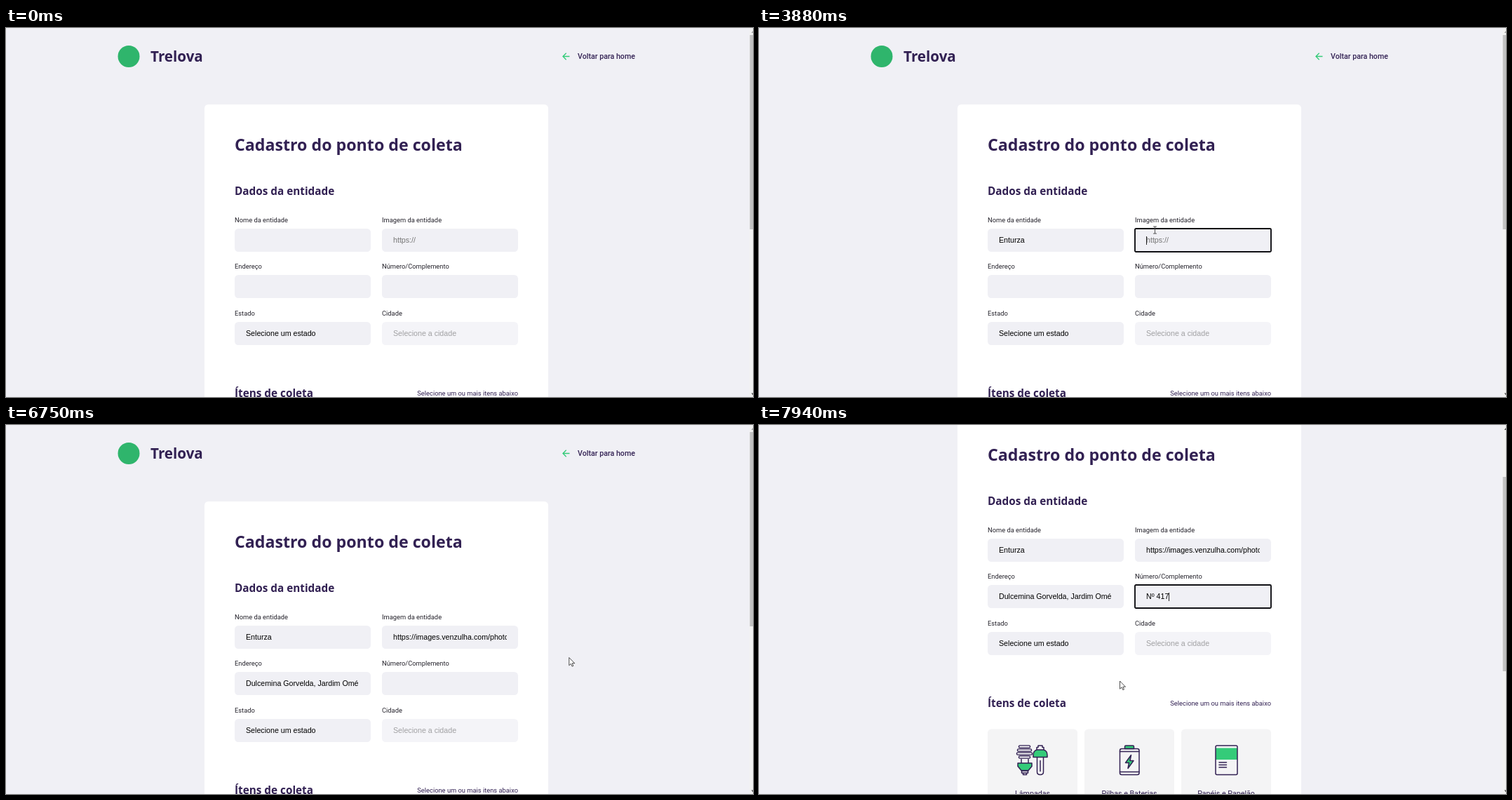
These frames come from a looping animation (1065 px wide and 526 px high, 8000 ms). An HTML page:

```html
<!DOCTYPE html>
<html lang="pt-BR">
<head>
<meta charset="utf-8">
<title>Cadastro</title>
<style>
  html, body { margin: 0; width: 100%; height: 100%; overflow: hidden; background: #f0f0f5; }
  svg { display: block; }
  text { fill: #322153; font-family: Roboto, sans-serif; }
  .head { font-family: "Open Sans", "Noto Sans", sans-serif; font-weight: 700; }
  .small { font-size: 9.33px; }
  .label { fill: #24222b; }
  .item { font-size: 10.67px; text-anchor: middle; }
  .value { font: 10.67px "Liberation Sans", Arial, sans-serif; fill: #000; }
  .card { fill: #f4f4f5; }
  .icon { fill: none; stroke: #322153; stroke-width: 1.5; stroke-linejoin: round; stroke-linecap: round; }
  .green { fill: #34cb79; }
</style>
</head>
<body>
<svg width="1065" height="526" viewBox="0 0 1065 526">
  <rect width="1065" height="526" fill="#f0f0f5"/>
  <g id="page">
    <circle cx="175" cy="40.5" r="15.5" fill="#2fb56c"/>
    <text class="head" x="206" y="48" font-size="20.6">Trelova</text>
    <path d="M803.5 40.5H794M798.7 35.8L794 40.5L798.7 45.2" fill="none" stroke="#34cb79" stroke-width="1.3"/>
    <text x="815" y="44.4" font-size="10.67" font-weight="500">Voltar para home</text>

    <rect x="283" y="109" width="490" height="900" rx="5.3" fill="#fff"/>
    <text class="head" x="326" y="174.5" font-size="23.2">Cadastro do ponto de coleta</text>
    <text class="head" x="326" y="238" font-size="15.3">Dados da entidade</text>
    <g id="form"></g>
    <text class="head" x="326" y="526.2" font-size="15.3">Ítens de coleta</text>
    <text class="small" x="730" y="524" text-anchor="end">Selecione um ou mais itens abaixo</text>

    <g transform="translate(326 557.5)">
      <rect class="card" width="128" height="120" rx="5.3"/>
      <g class="icon">
        <path d="M46 25H59M44 30H61M43 35H62M46 40H59" stroke-width="4.6"/>
        <path d="M46 25H59M44 30H61M43 35H62M46 40H59" stroke="#f4f4f5" stroke-width="1.8"/>
        <path class="green" d="M43 48.5H63V53L58 59H48L43 53Z"/>
        <path d="M48 43V48M58 43V48M48.5 59.5H57.5V62.5H48.5ZM50.5 62.5V65H55.5V62.5"/>
        <path class="green" d="M65 40V37Q65 31 70 29.5H80Q85 31 85 37V40Z"/>
        <path d="M70 29V26H72V23.5H78V26H80V29M70.5 40V61Q70.5 65 75 65T79.5 61V40M75 45V60"/>
      </g>
      <text class="item" x="64" y="95">Lâmpadas</text>
    </g>
    <g transform="translate(464 557.5)">
      <rect class="card" width="128" height="120" rx="5.3"/>
      <g class="icon">
        <path class="green" d="M57.5 28V25Q57.5 23.5 59 23.5H69Q70.5 23.5 70.5 25V28Z"/>
        <rect x="50.5" y="28" width="27.5" height="37" rx="2.5"/>
        <path d="M50.5 32H78M50.5 61H78"/>
        <path class="green" d="M66.5 37L58.5 48H63.5L62 56L70 45H65Z"/>
      </g>
      <text class="item" x="64" y="95">Pilhas e Baterias</text>
    </g>
    <g transform="translate(602 557.5)">
      <rect class="card" width="128" height="120" rx="5.3"/>
      <g class="icon">
        <rect class="green" stroke="none" x="49" y="27" width="31" height="16.5"/>
        <rect x="49" y="23.5" width="31" height="41.5" rx="2"/>
        <path d="M54 47.5H64.5M54 51H64.5M54 54.5H64.5"/>
      </g>
      <text class="item" x="64" y="95">Papéis e Papelão</text>
    </g>

    <rect id="ring" width="194" height="33" rx="1.5" fill="none" stroke="#101014" stroke-width="1.9"/>
    <path id="caret" d="M0.5 0V12" stroke="#222"/>
  </g>

  <rect x="1060" width="5" height="526" fill="#f1f1f1"/>
  <rect id="thumb" x="1060.5" width="5" height="277" fill="#c1c1c1"/>
  <path id="up" d="M1062.5 7L1065.5 3.5L1068.5 7Z"/>
  <path d="M1062.5 520.5L1065.5 524L1068.5 520.5Z" fill="#505050"/>

  <g id="pointer">
    <circle id="click" cx="-1.3" cy="-0.8" r="8" fill="#fbf05f" opacity=".9"/>
    <path id="arrow" d="M0 0V11.2L2.6 8.8L4.3 12.6L6 11.9L4.4 8.2H8Z" fill="#fff" stroke="#222" stroke-width=".8"/>
    <path id="beam" d="M-2.5 -5H2.5M-2.5 5H2.5M0 -5V5" fill="none" stroke="#444" stroke-width=".9"/>
  </g>
</svg>
<script>
const LOOP = 8000;
const BLINK = 530;
const CLICK = 160;
const WIDTH = 194, HEIGHT = 33, PAD = 16;
const $ = id => document.getElementById(id);

// Where the pointer comes to rest; "focus" names the field clicked there, -1 leaves the form.
const stops = [
  { at: 150, x: 810, y: 474 },
  { at: 400, travel: 250, x: 416, y: 275 },
  { at: 940, travel: 390, x: 422, y: 296 },
  { at: 1240, travel: 140, x: 513, y: 317 },
  { at: 1420, travel: 140, x: 424, y: 299, focus: 0 },
  { at: 3600, travel: 300, x: 564.5, y: 288, focus: 1 },
  { at: 4800, travel: 770, x: 472, y: 364, focus: 2 },
  { at: 5300, travel: 320, x: 978, y: 248, focus: -1 },
  { at: 5780, travel: 450, x: 490, y: 364, focus: 2 },
  { at: 6500, travel: 600, x: 1070, y: 200, focus: -1 },
  { at: 6680, travel: 160, x: 802.8, y: 331.5 },
  { at: 6950, travel: 160, x: 600, y: 364, focus: 3 },
  { at: 7500, travel: 400, x: 573.5, y: 367 },
  { at: 7940, travel: 180, x: 514.5, y: 365 },
];

const fields = [
  { label: 'Nome da entidade', value: 'Enturza', at: 2150, perLetter: 157 },
  { label: 'Imagem da entidade', hint: 'https://', ink: '#757575',
    value: 'https://images.venzulha.com/photo', at: 4150 },
  { label: 'Endereço', value: 'Dulcemina Gorvelda, Jardim Omé', at: 6150 },
  { label: 'Número/Complemento', value: 'Nº 417', at: 7500 },
  { label: 'Estado', hint: 'Selecione um estado', ink: '#000' },
  { label: 'Cidade', hint: 'Selecione a cidade', ink: '#a0a0a2', fill: '#f4f4f8' },
];

fields.forEach((f, i) => {
  f.x = 326 + (i % 2) * 210;
  f.y = Math.round(285.7 + Math.floor(i / 2) * 66.5);
  $('form').insertAdjacentHTML('beforeend', `
    <text class="small label" x="${f.x}" y="${f.y - 8.6}">${f.label}</text>
    <rect x="${f.x}" y="${f.y}" width="${WIDTH}" height="${HEIGHT}" rx="5.3" fill="${f.fill || '#f0f0f5'}"/>
    <svg x="${f.x + PAD}" y="${f.y}" width="${WIDTH - 2 * PAD}" height="${HEIGHT}">
      <text class="value" y="19.8"></text>
    </svg>`);
  f.text = $('form').lastElementChild.firstElementChild;
});

const clamp = (v, lo, hi) => Math.min(hi, Math.max(lo, v));
const within = (v, from, size) => v >= from && v < from + size;
const show = (el, on) => el.setAttribute('visibility', on ? 'visible' : 'hidden');
const move = (el, x, y) => el.setAttribute('transform', `translate(${x} ${y})`);

// The pointer and the scroll are refreshed only every 90 ms.
const tickOf = t => 7760 + Math.floor((t - 7760) / 90) * 90;
const scrollAt = t => Math.round(124 * clamp((t - 7710) / 230, 0, 1));

function pointerAt(t) {
  const [first, ...rest] = stops;
  return rest.reduce((p, s) => {
    const k = clamp((t - s.at + s.travel) / s.travel, 0, 1);
    return { x: p.x + (s.x - p.x) * k, y: p.y + (s.y - p.y) * k };
  }, first);
}

function lettersAt(f, t) {
  if (!f.value || t < f.at) return 0;
  return f.perLetter ? Math.min(f.value.length, 1 + Math.floor((t - f.at) / f.perLetter)) : f.value.length;
}

function drawFields(t) {
  for (const f of fields) {
    const count = lettersAt(f, t);
    f.text.textContent = count ? f.value.slice(0, count) : f.hint || '';
    f.text.style.fill = count ? '#000' : f.ink;
  }
}

function drawFocus(t, stop) {
  const f = stop && fields[stop.focus];
  show($('ring'), f);
  show($('caret'), false);
  if (!f) return;
  move($('ring'), f.x, f.y);

  const count = lettersAt(f, t);
  const lastKey = count ? f.at + (count - 1) * (f.perLetter || 0) : 0;
  const idle = t - Math.max(stop.at, lastKey);
  const width = count ? f.text.getComputedTextLength() : 0;
  show($('caret'), Math.floor(idle / BLINK) % 2 === 0);
  move($('caret'), Math.round(f.x + PAD + Math.min(width, WIDTH - 2 * PAD - 1)), f.y + 11);
}

function drawPointer(t, scroll, stop) {
  const { x, y } = pointerAt(tickOf(t));
  const overField = fields.some(f => within(x, f.x, WIDTH) && within(y + scroll, f.y, HEIGHT));
  move($('pointer'), x, y);
  $('pointer').style.display = t < stops[0].at ? 'none' : '';
  show($('beam'), overField);
  show($('arrow'), !overField);
  show($('click'), stop && stop.focus >= 0 && t < stop.at + CLICK);
}

function render(t) {
  const scroll = scrollAt(tickOf(t));
  const stop = stops.filter(s => 'focus' in s && s.at <= t).pop();
  move($('page'), 0, -scroll);
  $('thumb').setAttribute('y', 10 + scroll * 0.516);
  $('up').setAttribute('fill', scroll ? '#505050' : '#a3a3a3');
  drawFields(t);
  drawFocus(t, stop);
  drawPointer(t, scroll, stop);
}

const start = performance.now();
function loop() {
  render((performance.now() - start) % LOOP);
  requestAnimationFrame(loop);
}
loop();
</script>
</body>
</html>
```
